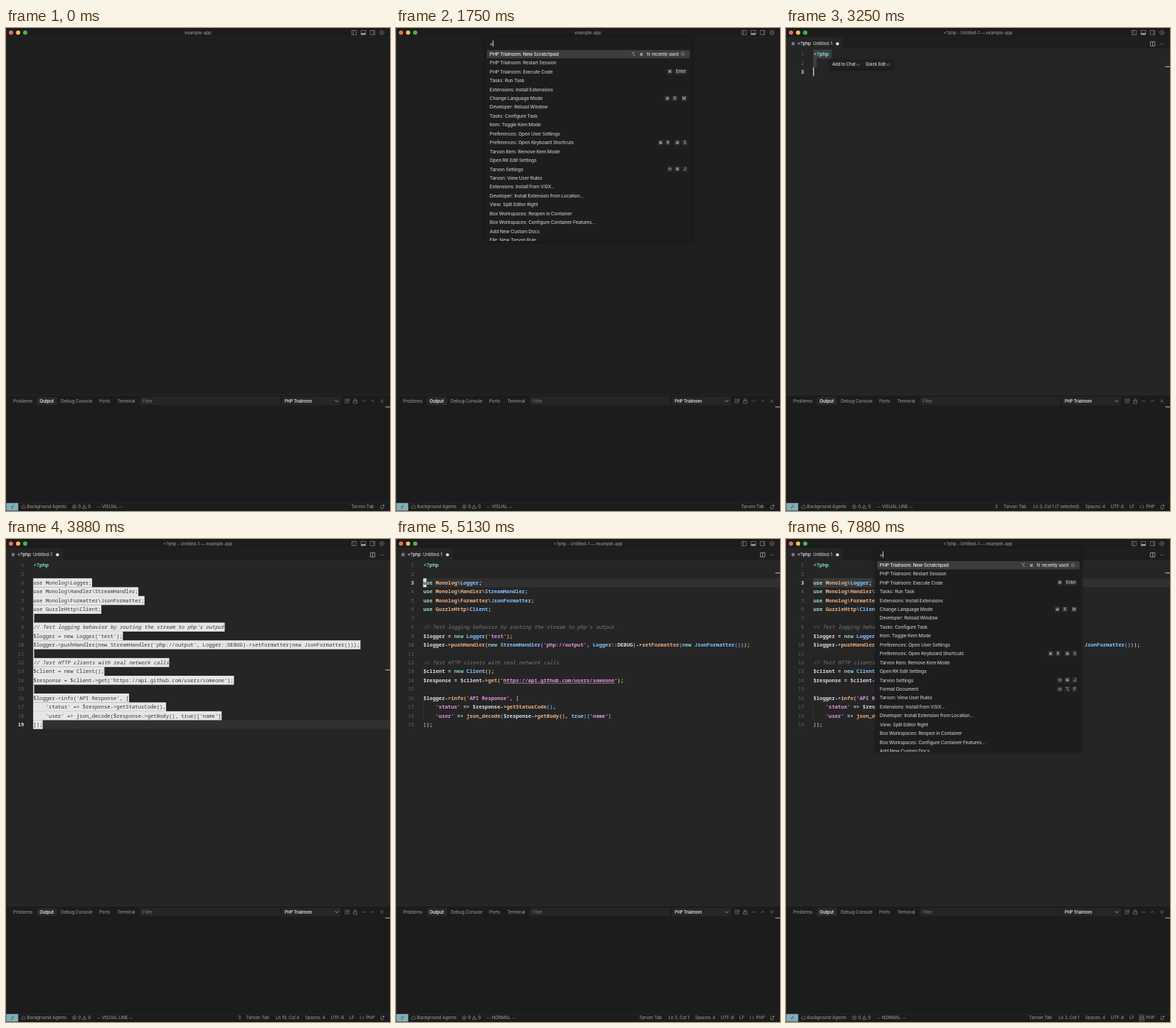
An HTML page that plays this animation: 540 by 678 pixels, repeating every 8 s.

```html
<!DOCTYPE html>
<html lang="en">
<head>
<meta charset="utf-8">
<title>Scratchpad demo</title>
<style>
  html, body { margin: 0; width: 100%; height: 100%; overflow: hidden; background: #1e1e1f; }
  svg { display: block; width: 540px; height: 678px; }
  text { white-space: pre; font: 500 6.35px Inter, 'DejaVu Sans', sans-serif; letter-spacing: -.025em; }
  .code text { font: 600 7.23px 'Noto Sans Mono', 'DejaVu Sans Mono', monospace; letter-spacing: 0; }
  .code .num, .code #flash text { font-weight: 500; }
  .code .note { font-style: italic; font-weight: 500; }
  .code .num.active { font-weight: 700; }
  .icon { fill: none; stroke: #868687; stroke-width: .7; }
</style>
</head>
<body>
<svg id="stage" viewBox="0 0 540 678"></svg>
<script>
const LOOP = 8000, PITCH = 12.44, CHAR = 4.338, LEFT = 38.4;
const rowY = n => 36.5 + (n - 1) * PITCH;
const esc = s => String(s).replace(/&/g, '&amp;').replace(/</g, '&lt;').replace(/>/g, '&gt;');

const rect = (x, y, w, h, fill, extra = '') =>
  `<rect x="${x}" y="${y}" width="${w}" height="${h}" fill="${fill}" ${extra}/>`;
const dot = (x, y, r, fill) => `<circle cx="${x}" cy="${y}" r="${r}" fill="${fill}"/>`;
const text = (x, y, s, fill = '#8c8c8d', size = 6.35, extra = '') =>
  `<text x="${x}" y="${y}" fill="${fill}" style="font-size:${size}px;${extra}">${esc(s)}</text>`;
const slot = (id, x, y, extra = '') => `<text id="${id}" x="${x}" y="${y}" fill="#8c8c8d" style="${extra}"></text>`;
const icon = (d, extra = '') => `<path class="icon" d="${d}" ${extra}/>`;
const group = (id, body, extra = '') => `<g id="${id}" ${extra}>${body}</g>`;
const END = 'text-anchor:end;', MID = 'text-anchor:middle;';

const dots = (x, y) => [-2, 0, 2].map(d => dot(x + d, y, .55, '#a0a0a1')).join('');
const gear = (x, y, r) =>
  `<circle class="icon" cx="${x}" cy="${y}" r="${r}" stroke-dasharray="1.4 .45" style="stroke-width:1"/>` +
  `<circle class="icon" cx="${x}" cy="${y}" r="${r * .4}"/>`;
const frame = (x, y) => `M${x - 3.2} ${y - 3}h6.4v6h-6.4z`;

/* ---------- window chrome ---------- */
function chrome() {
  return rect(0, 0, 540, 678, '#1e1e1f') +
    rect(0, 0, 540, 13, '#1c1c1d') + rect(0, 12.6, 540, .6, '#29292a') +
    dot(7, 6.4, 3, '#ed6a5f') + dot(17, 6.4, 3, '#f5bf4f') + dot(27, 6.4, 3, '#3dbb49') +
    icon(frame(489.5, 6.5) + 'M488.6 3.5v6') +
    icon(frame(502.5, 6.5)) + rect(499.3, 7, 6.4, 2.5, '#949495') +
    icon(frame(515.5, 6.5) + 'M517 3.5v6') + gear(528.5, 6.5, 3) +
    slot('heading', 270, 8.7, MID + 'font-size:6.2px');
}

function outputPanel() {
  const tabs = [[10, 'Problems'], [77, 'Debug Console'], [131, 'Ports'], [156.4, 'Terminal']];
  return rect(0, 515, 540, 152, '#1c1c1d') + rect(0, 514.7, 540, .7, '#2d2d2e') +
    tabs.map(([x, s]) => text(x, 525.7, s)).join('') +
    rect(43.5, 518, 28, 11.2, '#2a2a2b', 'rx="1.5"') +
    text(47.3, 525.7, 'Output', '#e4e4e4', 6.2, 'font-weight:600') +
    rect(188, 517.8, 198, 11.6, '#252526', 'rx="1"') + text(192, 525.9, 'Filter', '#707071', 6.2) +
    rect(388, 517.8, 83, 11.6, '#262627', 'rx="1"') +
    text(392, 525.6, 'PHP Trialroom', '#e0e0e0', 5.8, 'font-weight:600') +
    icon('M462.8 522.4l2.3 2.4 2.3-2.4', 'style="stroke:#ccc"') +
    icon('M476 521.2h3.4M476 523.6h3.4M476 526h6.4M480.4 520.9h2v3h-2z') +
    icon('M488.6 523.4h5v3.4h-5zM489.7 523.4v-1.5a1.4 1.4 0 0 1 2.8 0v1.5') +
    dots(503, 523.7) + icon('M513.2 524.8l2.4-2.4 2.4 2.4') +
    icon('M526.4 521.4l4.4 4.4M530.8 521.4l-4.4 4.4') + rect(533.5, 531.3, 6.5, 1.2, '#a8a8a8');
}

function statusBar() {
  const y = 674.2;
  return rect(0, 667, 540, 11, '#1c1c1d') + rect(0, 666.7, 540, .6, '#2d2d2e') +
    rect(0, 0, .8, 678, '#343435') + rect(.4, 666.8, 16.8, 10.7, '#83adb7') +
    icon('M7 671.5l2 1.6-2 1.6M11 669.4l-2 1.6 2 1.6', 'style="stroke:#2b4a52"') +
    icon('M22.8 674h4.2a1.4 1.4 0 0 0 0-2.7 2.1 2.1 0 0 0-4 .1 1.3 1.3 0 0 0-.2 2.6z') +
    text(29.5, y, 'Background Agents', '#8c8c8d', 6.2) +
    '<circle class="icon" cx="96" cy="672" r="2.6"/>' + icon('M95 671l2 2M97 671l-2 2') +
    text(101.3, y, '0') + icon('M110 669.4l2.8 5h-5.6zM110 671.2v1.6') + text(115.3, y, '0') +
    slot('mode', 127.6, y) + slot('keys', 0, y, END) + slot('assist', 0, y, END) +
    group('fileInfo',
      slot('position', 412.3, y, END) +
      text(420.7, y, 'Spaces: 4', '#8c8c8d', 6.2) + text(456.5, y, 'UTF-8') + text(482.8, y, 'LF') +
      group('busy', rect(496, 667.3, 8.5, 10.4, '#3a3a3b')) +
      icon('M499.4 669.8q-1.2 0-1 1.1t-.8 1.1q1 0 .8 1.1t1 1.1M501.3 669.8q1.2 0 1 1.1t.8 1.1q-1 0-.8 1.1t-1 1.1') +
      text(506.2, y, 'PHP')) +
    icon('M526.4 674h4.8M527 674v-2.2a2 2 0 0 1 2-2M530.7 674v-1.6M528 675.4h1.5') +
    dot(531, 670.3, 1.1, '#a0a0a1');
}

/* ---------- code ---------- */
const lines = `<?php

use Monolog\\Logger;
use Monolog\\Handler\\StreamHandler;
use Monolog\\Formatter\\JsonFormatter;
use GuzzleHttp\\Client;

// Test logging behavior by routing the stream to php's output
$logger = new Logger('test');
$logger->pushHandler(new StreamHandler('php://output', Logger::DEBUG)->setFormatter(new JsonFormatter()));

// Test HTTP clients with real network calls
$client = new Client();
$response = $client->get('https://api.github.com/users/someone');

$logger->info('API Response', [
    'status' => $response->getStatusCode(),
    'user' => json_decode($response->getBody(), true)['name']
]);`.split('\n');

const rules = [
  [/^\/\/.*/, '#7a7a7b'], [/^<\?php/, '#83d6c5'], [/^'[^']*'/, '#e394dc'],
  [/^use\b/, '#a5dbd0'], [/^(new|true)\b/, '#82d2ce'], [/^\$\w+/, '#dcdce2'], [/^\w+\\/, '#efb080'],
  [/^DEBUG/, '#dcdce2'], [/^[a-z]\w*(?=\()/, '#efb080'], [/^[A-Z]\w*/, '#87c3ff'],
  [/^[()[\]]/, null], [/^[^\w'$()[\]]/, '#dcdce2'], [/^\w+/, '#dcdce2']
];
const brackets = ['#dcc870', '#d58ad6', '#5fabec'];
let depth = 0;

function highlight(line) {
  let out = '';
  while (line) {
    const [rule, colour] = rules.find(([r]) => r.test(line));
    const word = line.match(rule)[0];
    const fill = colour || brackets[('(['.includes(word) ? depth++ : --depth) % 3];
    out += `<tspan fill="${fill}">${esc(word)}</tspan>`;
    line = line.slice(word.length);
  }
  return out;
}

const codeRow = (n, body, fill) =>
  `<text class="${lines[n - 1].startsWith('//') ? 'note' : ''}" x="${LEFT}" y="${rowY(n) + 2.6}" fill="${fill}">${body}</text>`;
const rows = fn => lines.map((line, i) => i < 2 ? '' : fn(line, i + 1)).join('');
const rowBox = (n, w, fill) => rect(LEFT - .2, rowY(n) - 6.2, w, PITCH + .1, fill);

function tabBar() {
  return rect(0, 13, 540, 16.5, '#1e1e1f') + rect(0, 29, 540, 486, '#252526') +
    rect(0, 13, 80, 17, '#252526') +
    dot(10, 22, 2.4, '#7b6f9c') + text(16, 24.4, '<?php', '#e8e8e8', 6.5) +
    text(38, 24.4, 'Untitled-1', '#c4c4c5', 6.2) + dot(72.4, 22.2, 2.1, '#e8e8e8') +
    icon(frame(515.6, 22.2) + 'M515.6 19.2v6', 'style="stroke:#bbb"') + dots(528.5, 22.2);
}

function codeArea() {
  const urlX = LEFT + 26 * CHAR;
  const numbers = lines.map((_, i) =>
    `<text class="num" x="25.4" y="${rowY(i + 1) + 2.6}" text-anchor="end">${i + 1}</text>`).join('');
  return group('lineGlow', rect(LEFT - .2, -6.2, 502, PITCH, '#303031')) +
    group('marker', rect(533.5, -.6, 6.5, 1.2, '#b0b0b0')) +
    group('lineMark', rowBox(3, 82.6, '#3a3b3d')) +
    group('picked', rowBox(1, 26, '#3b4042') + rowBox(2, 5, '#3b4042')) +
    numbers + codeRow(1, highlight(lines[0]), '#83d6c5') +
    group('source',
      [17, 18].map(n => rect(LEFT, rowY(n) - 6.2, .6, PITCH, '#39393a')).join('') +
      rows((line, n) => codeRow(n, highlight(line), '#dcdce2'))) +
    group('link', rect(urlX, rowY(14) + 4, 36 * CHAR, .6, '#e394dc')) +
    group('flash',
      rows((line, n) => rowBox(n, line ? line.length * CHAR + .4 : 1.4, '#e6e6e6')) +
      rows((line, n) => codeRow(n, esc(line), '#353536'))) +
    group('bar', rect(-.2, -6.2, 1.1, 12.4, '#f0f0f0')) +
    group('block', rowBox(3, CHAR + .3, '#dedede') + codeRow(3, 'u', '#303031'));
}

function popup() {
  return rect(62, 44.8, 88.5, 12.6, '#1f1f20', 'rx="1.5" style="filter:drop-shadow(0 1px 2px #0008)"') +
    text(65, 53, 'Add to Chat', '#d4d4d4', 6.1) + text(98.4, 53, '⌘L', '#6c6c6d', 4.2) +
    text(112, 53, 'Quick Edit', '#d4d4d4', 6.1) + text(140.4, 53, '⌘K', '#6c6c6d', 4.2);
}

/* ---------- command palette ---------- */
const keysFor = {
  'PHP Trialroom: Execute Code': [[385, '⌘'], [400.7, 'Enter']],
  'Change Language Mode': [[381.5, '⌘'], [392, 'R'], [405, 'M']],
  'Preferences: Open Keyboard Shortcuts': [[372, '⌘'], [382.3, 'R'], [395.6, '⌘'], [406, 'S']],
  'Tarvon Settings': [[385, '⇧'], [395.6, '⌘'], [406, 'J']],
  'Format Document': [[385, '⇧'], [395.6, '⌥'], [406, 'F']]
};
const commands = ['PHP Trialroom: New Scratchpad', 'PHP Trialroom: Restart Session',
  'PHP Trialroom: Execute Code', 'Tasks: Run Task', 'Extensions: Install Extensions',
  'Change Language Mode', 'Developer: Reload Window', 'Tasks: Configure Task',
  'Kem: Toggle Kem Mode', 'Preferences: Open User Settings',
  'Preferences: Open Keyboard Shortcuts', 'Tarvon Kem: Remove Kem Mode',
  'Open RK Edit Settings', 'Tarvon Settings', 'Format Document', 'Tarvon: View User Rules',
  'Extensions: Install from VSIX...', 'Developer: Install Extension from Location...',
  'View: Split Editor Right', 'Box Workspaces: Reopen in Container',
  'Box Workspaces: Configure Container Features...', 'Add New Custom Docs', 'File: New Tarvon Rule'];

const keyCap = (x, y, s) => {
  const w = s.length > 1 ? 18 : 8;
  return rect(x - w / 2, y - 4.1, w, 8.2, '#2b2b2c', 'rx="1.5"') +
    text(x, y + 2.1, s, '#c4c4c5', 5.8, MID);
};

function commandList(names) {
  return names.slice(0, 22).map((name, i) => {
    const y = rowY(i + 1);
    return text(131.8, y + 2.3, name, i ? '#c0c0c1' : '#f0f0f0', 6.65) +
      (keysFor[name] || []).map(([x, s]) => keyCap(x, y, s)).join('');
  }).join('');
}

function palette() {
  return rect(125.5, 13, 290.5, 286.5, '#1d1d1e', 'rx="3" style="filter:drop-shadow(0 0 2px #0006)"') +
    text(131.8, 24.6, '>', '#d6d6d6', 6.8) + group('inputCaret', rect(136, 17.4, .9, 8.8, '#e8e8e8')) +
    rect(128, 31, 285, 11.4, '#3d3d3e', 'rx="2"') +
    [[333.5, '⌥'], [345, '⌘'], [354.8, 'N']].map(([x, s]) => text(x, 38.7, s, '#d8d8d8', 5.7, MID)).join('') +
    text(397, 38.8, 'recently used', '#e0e0e0', 6.05, END) + gear(403.4, 36.5, 2.3) +
    '<clipPath id="clip"><rect x="126" y="30" width="290" height="269"/></clipPath><g clip-path="url(#clip)">' +
    group('firstList', commandList(commands.filter(c => c !== 'Format Document'))) +
    group('secondList', commandList(commands)) + '</g>';
}

/* ---------- assembly and timing ---------- */
document.getElementById('stage').innerHTML = chrome() +
  group('editor', tabBar() + group('code', codeArea(), 'class="code"') + group('popup', popup())) +
  outputPanel() + statusBar() + group('palette', palette());

const el = {};
document.querySelectorAll('[id]').forEach(node => el[node.id] = node);
const numbers = [...document.querySelectorAll('.num')];
const show = (id, on) => el[id].setAttribute('display', on ? 'inline' : 'none');
const put = (id, s) => { if (el[id].textContent !== s) el[id].textContent = s; };
const move = (id, x, y) => el[id].setAttribute('transform', `translate(${x} ${y})`);

function render(t) {
  const within = (a, b) => t >= a && t < b;
  const open = t >= 2000, picked = within(3000, 3880), pasted = t >= 3880;
  const normal = t >= 5130, reopened = t >= 7500, visualLine = within(3000, 5130);
  const line = pasted && !normal ? 19 : 3;

  show('editor', open);
  show('picked', picked);
  show('popup', within(3130, 3880));
  show('source', pasted);
  show('flash', within(3880, 4000));
  show('link', t >= 4880);
  show('lineGlow', open && !picked);
  show('lineMark', reopened);
  move('lineGlow', 0, rowY(line));
  move('marker', 0, !pasted ? 54.3 : normal ? 47.6 : 183.8);
  show('bar', within(2000, 3880) || within(4000, 4380) || within(4880, 5130));
  move('bar', LEFT + (line === 19 ? 3 * CHAR : 0), rowY(line));
  show('block', normal && !reopened && (t - 5130) % 1000 < 500);

  numbers.forEach((node, i) => {
    const active = i + 1 === line;
    node.setAttribute('display', i < 3 || pasted ? 'inline' : 'none');
    node.setAttribute('fill', active ? '#e6e6e6' : '#626263');
    node.classList.toggle('active', active);
  });

  show('palette', within(500, 1880) || reopened);
  show('firstList', !reopened);
  show('secondList', reopened);
  show('inputCaret', !within(1000, 1500));

  put('heading', open ? '<?php - Untitled-1 — example-app' : 'example-app');
  put('mode', `-- ${!open ? 'VISUAL' : visualLine ? 'VISUAL LINE' : 'NORMAL'} --`);
  put('position', picked ? 'Ln 3, Col 1 (7 selected)' : line === 19 ? 'Ln 19, Col 4' : 'Ln 3, Col 1');
  put('keys', visualLine ? '3' : '');
  put('assist', 'Tarvon Tab');
  show('fileInfo', open);
  show('busy', t >= 7750);
  el.keys.setAttribute('x', picked ? 297.6 : 330);
  el.assist.setAttribute('x', !open ? 517.6 : picked ? 338 : line === 19 ? 370 : 374);
}

function tick() {
  render(performance.now() % LOOP);
  requestAnimationFrame(tick);
}
tick();
</script>
</body>
</html>
```
